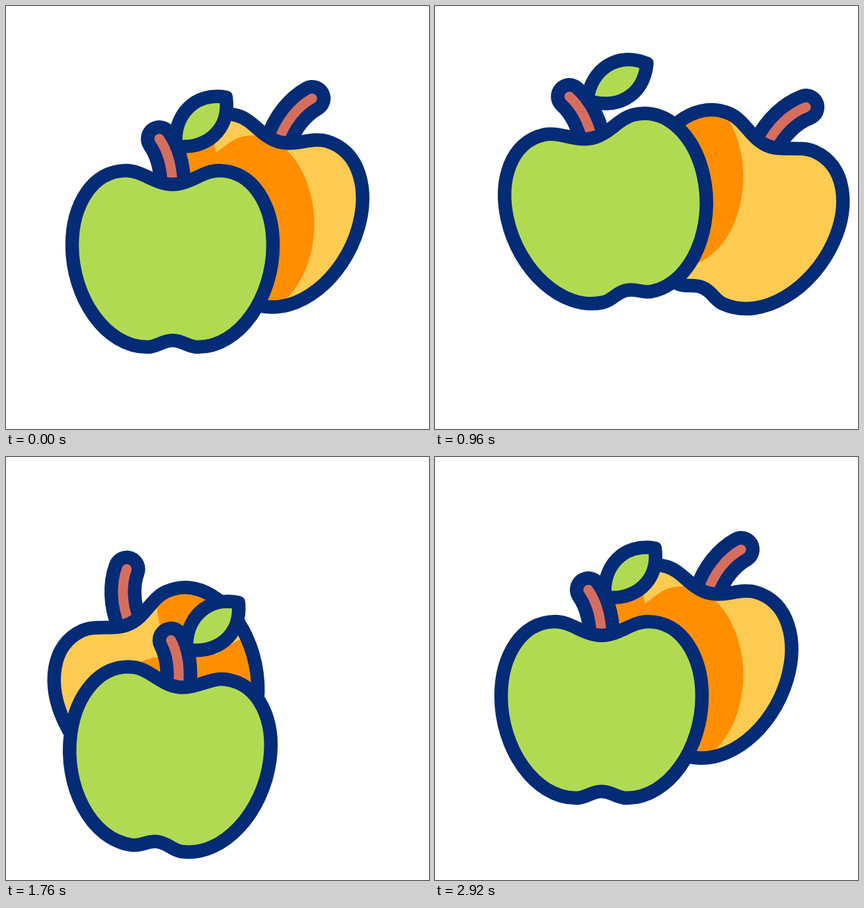
Recreate the animation shown at these times as an HTML page with a canvas. Size 640 px wide and 640 px high, loop 3000 ms.

```html
<!DOCTYPE html>
<html lang="en">
<head>
<meta charset="utf-8">
<title>Swinging apples</title>
<style>
  html, body { margin: 0; width: 100%; height: 100%; overflow: hidden; background: #fff; }
  canvas { display: block; width: 640px; height: 640px; }
</style>
</head>
<body>
<canvas id="stage" width="640" height="640"></canvas>
<script>
const LOOP = 3000, STEP = 40, SIZE = 640;
const NAVY = '#042b76', GREEN = '#b1da53', YELLOW = '#fdcb52', ORANGE = '#ff8f00', BROWN = '#d66e5e';
const OUTLINE = 20.5, STEM = 15, STEM_OUTLINE = 56, SHADE_STEM = 76;

const ctx = document.getElementById('stage').getContext('2d');
const layer = document.createElement('canvas');
layer.width = layer.height = SIZE;
const fillCtx = layer.getContext('2d');

// Apple parts are drawn around the apple's centre, the leaf around its lower tip.
const body = new Path2D(
  'M0 -113C-26 -113 -46 -134 -70 -134C-122 -134 -152 -81 -152 -21' +
  'C-152 57 -102 133 -38 133C-23 133 -16 123 0 123C16 123 23 133 38 133' +
  'C102 133 152 57 152 -21C152 -81 122 -134 70 -134C46 -134 26 -113 0 -113Z');
const frontStem = new Path2D('M0 -113C-1 -143 -8 -165 -20 -182');
const backStem = new Path2D('M0 -113C1 -145 14 -173 31 -190');
const shadeStem = new Path2D('M14 -198L30 -105');
const leaf = new Path2D('M76 -74C28 -82 -4 -47 0 0C43 6 83 -22 76 -74Z');

const TURNS = [200, 790, 1610, 2185], REST = 2920;

// Swings from rest through three peaks and back, trailing the shared beat by lag.
function swing(t, lag, ...peaks) {
  const times = [...TURNS.map(turn => turn + lag), REST];
  const values = [0, ...peaks, 0];
  const next = times.findIndex(time => t < time);
  if (next < 1) return 0;
  const phase = (t - times[next - 1]) / (times[next] - times[next - 1]);
  const eased = (1 - Math.cos(Math.PI * phase)) / 2;
  return values[next - 1] + (values[next] - values[next - 1]) * eased;
}

function place(c, x, y, degrees, draw) {
  c.save();
  c.translate(x, y);
  c.rotate(degrees * Math.PI / 180);
  draw();
  c.restore();
}

function stroke(c, path, color, width) {
  c.strokeStyle = color;
  c.lineWidth = width;
  c.stroke(path);
}

function fill(c, path, color) {
  c.fillStyle = color;
  c.fill(path);
}

function drawShade(lift) {
  place(fillCtx, 252, 345 + lift, 0, () => {
    stroke(fillCtx, shadeStem, ORANGE, SHADE_STEM);
    place(fillCtx, 66, -2, -12, () => fill(fillCtx, body, ORANGE));
  });
}

function drawBack(t, lift) {
  const shift = swing(t, 130, 76, -147, 56);
  const drop = -0.28 * Math.min(0, shift);
  const at = [381 + shift, 314 + drop, 16 + swing(t, 170, 8, -41, 10)];

  fillCtx.globalCompositeOperation = 'source-over';
  fillCtx.clearRect(0, 0, SIZE, SIZE);
  place(fillCtx, ...at, () => {
    stroke(fillCtx, backStem, BROWN, STEM);
    fill(fillCtx, body, YELLOW);
  });
  fillCtx.globalCompositeOperation = 'source-atop';
  drawShade(lift);

  place(ctx, ...at, () => stroke(ctx, backStem, NAVY, STEM_OUTLINE));
  ctx.drawImage(layer, 0, 0);
  place(ctx, ...at, () => stroke(ctx, body, NAVY, OUTLINE));
}

function drawFront(t, lift) {
  place(ctx, 252, 335 + lift, swing(t, 95, -13, 7.8, -4.8), () => {
    ctx.translate(0, 48);
    place(ctx, 5, -171, swing(t, 95, 26, -6, 24), () => {
      fill(ctx, leaf, GREEN);
      stroke(ctx, leaf, NAVY, OUTLINE);
    });
    stroke(ctx, frontStem, NAVY, STEM_OUTLINE);
    stroke(ctx, frontStem, BROWN, STEM);
    fill(ctx, body, GREEN);
    stroke(ctx, body, NAVY, OUTLINE);
  });
}

function render(now) {
  const t = Math.floor((now % LOOP) / STEP) * STEP;
  const lift = swing(t, 0, -91, 99, -36);
  ctx.fillStyle = '#fff';
  ctx.fillRect(0, 0, SIZE, SIZE);
  drawBack(t, lift);
  drawFront(t, lift);
}

for (const c of [ctx, fillCtx]) c.lineCap = c.lineJoin = 'round';

let start;
function tick(now) {
  start ??= now;
  render(Math.max(0, now - start));
  requestAnimationFrame(tick);
}
render(0);
requestAnimationFrame(tick);
</script>
</body>
</html>
```
